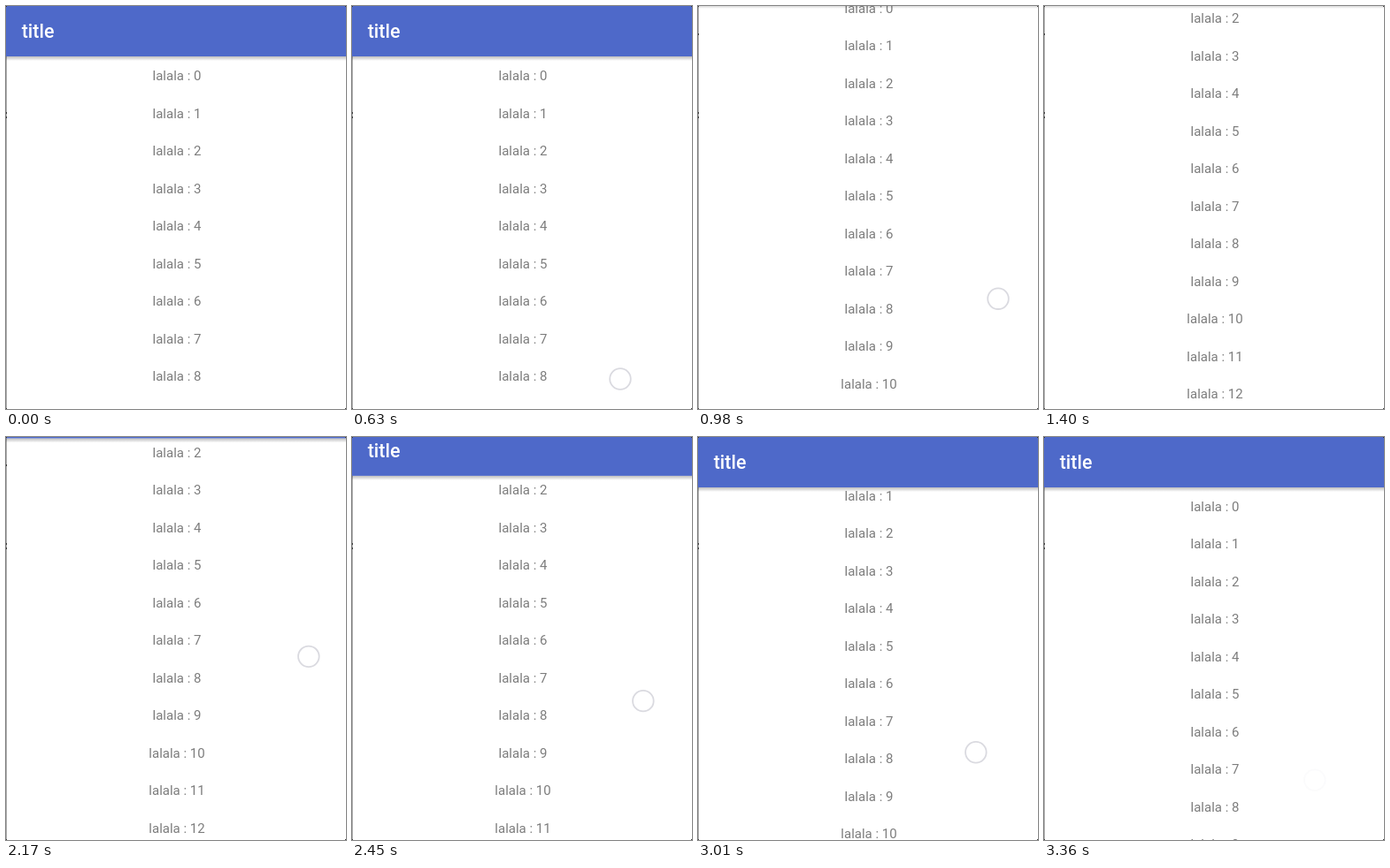
An HTML page with a canvas that plays this animation: 384x456 px, repeating every 3.92 s.

```html
<!DOCTYPE html>
<html lang="en">
<head>
<meta charset="utf-8">
<title>Scrolling list</title>
<style>
  html, body { margin: 0; width: 100%; height: 100%; overflow: hidden; background: #fff; }
  canvas { display: block; }
</style>
</head>
<body>
<canvas id="stage" width="384" height="456"></canvas>
<script>
const ctx = document.getElementById('stage').getContext('2d');
const W = 384, H = 456, LOOP = 3920, STEP = 70;
const ROW = 42.5, FIRST_BASELINE = 84.25;
const BAR = 57, HIDDEN = -59, TRAVEL = 150;

// Each swipe: touch time, lift time, fade span, sideways start and drift per scrolled pixel
const up = { down: 630, lift: 1070, fade: [1120, 1300], x: 303, drift: -.47 };
const back = { down: 2100, lift: 3130, fade: [3200, 3380], x: 297, drift: -.306 };

const ramp = (t, from, to) => Math.min(1, Math.max(0, (t - from) / (to - from)));
const ease = (t, from, to) => {
  const p = ramp(t, from, to);
  return p * p * (3 - 2 * p);
};

// One pull up, then two pulls back down
const scrollAt = t =>
  -TRAVEL * ease(t, 630, 1320) + 52 * ease(t, 2100, 2545) + 97.6 * ease(t, 2712, 3360);

function drawList(offset) {
  ctx.font = '15px Roboto, sans-serif';
  ctx.fillStyle = '#7d7d7d';
  ctx.textAlign = 'center';
  for (let i = 0; i < 14; i++) {
    ctx.fillText('lalala : ' + i, 193, FIRST_BASELINE + i * ROW + offset);
  }
}

function drawBar(y) {
  const bottom = BAR + y;
  const shade = ctx.createLinearGradient(0, bottom, 0, bottom + 5);
  shade.addColorStop(0, 'rgba(0,0,0,.26)');
  shade.addColorStop(1, 'rgba(0,0,0,0)');
  ctx.fillStyle = shade;
  ctx.fillRect(0, bottom, W, 5);
  ctx.fillStyle = '#4e69c9';
  ctx.fillRect(0, y, W, BAR);
  ctx.font = '500 21.4px Roboto, sans-serif';
  ctx.fillStyle = '#fff';
  ctx.textAlign = 'left';
  ctx.fillText('title', 17.7, 36.3 + y);
}

function drawTouch(swipe, t) {
  if (t < swipe.down) return;
  const pull = scrollAt(Math.min(t, swipe.lift));
  ctx.globalAlpha = 1 - ramp(t, ...swipe.fade);
  ctx.beginPath();
  ctx.arc(swipe.x + swipe.drift * pull, 422 + 1.185 * pull, 11.8, 0, Math.PI * 2);
  ctx.fillStyle = 'rgba(255,255,255,.6)';
  ctx.fill();
  ctx.strokeStyle = '#dadae0';
  ctx.lineWidth = 1.8;
  ctx.stroke();
  ctx.globalAlpha = 1;
}

function drawEdge() {
  ctx.fillStyle = '#a5a5a5';
  ctx.fillRect(0, 0, 1, H);
  ctx.fillStyle = '#333';
  for (const y of [31, 120, 125]) ctx.fillRect(0, y, 1, 2);
}

function drawCorners() {
  ctx.fillStyle = '#333';
  for (const x of [0, W - 1]) {
    for (const y of [0, H - 1]) ctx.fillRect(x, y, 1, 1);
  }
}

function draw(t) {
  const offset = scrollAt(t);
  // The bar leaves with the first pull and returns at once on the way back
  const anchor = t < back.down ? 0 : HIDDEN + TRAVEL;
  ctx.fillStyle = '#fff';
  ctx.fillRect(0, 0, W, H);
  drawList(offset);
  drawEdge();
  drawBar(Math.max(HIDDEN, Math.min(0, offset + anchor)));
  drawTouch(t < back.down ? up : back, t);
  drawCorners();
}

const start = performance.now();
function tick() {
  const t = (performance.now() - start) % LOOP;
  draw(Math.floor(t / STEP) * STEP);
  requestAnimationFrame(tick);
}
tick();
</script>
</body>
</html>
```
